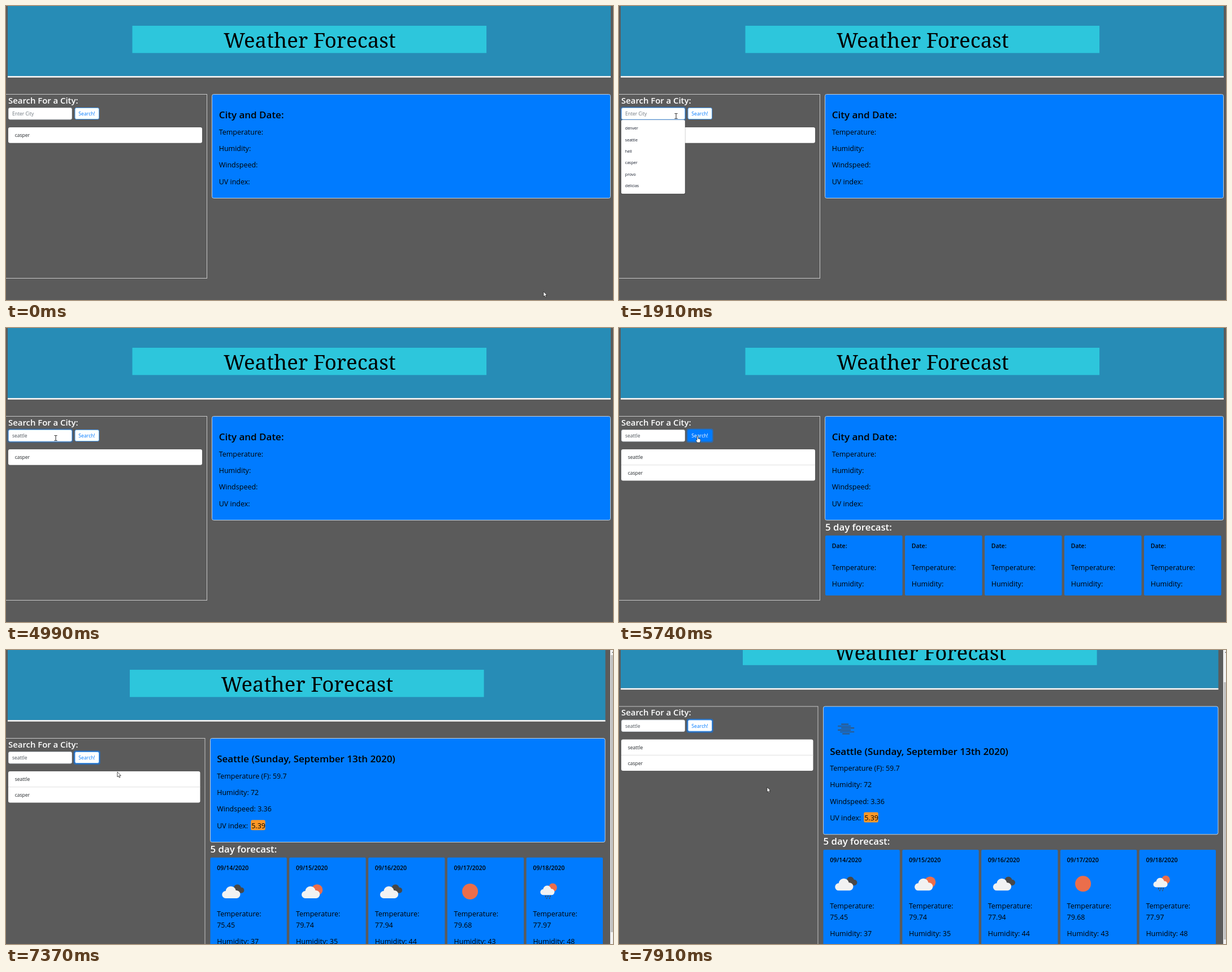
Write an HTML page that moves like this. It is 1074 px wide and 521 px high and loops after 8000 ms.

```html
<!DOCTYPE html>
<html lang="en">
<head>
<meta charset="utf-8">
<title>Weather Forecast</title>
<style>
  html, body { margin: 0; height: 100%; overflow: hidden; background: #5b5b5b; }
  svg { display: block; width: 1074px; height: 521px; font-family: "Open Sans", "Noto Sans", sans-serif; }
  text { white-space: pre; }
  .title { font-family: "Noto Serif", serif; text-anchor: middle; }
  .strong { font-weight: 600; }
</style>
</head>
<body>
<svg id="stage" viewBox="0 0 1074 521"></svg>
<script>
const LOOP = 8000;
const BLUE = '#007bff';
const stage = document.getElementById('stage');

// When things happen, in ms
const FOCUS = 1360, SUGGEST = 1490, PRESS = 5520, RESULT = 5630,
      HEADING = 6070, CURRENT = 6530, FORECAST = 6620, MAIN_ICON = 7480;

// Pointer moves: start, end, steps, target x, target y
const MOVES = [
  [100, 400, 4, 410, 298], [550, 1260, 8, 101, 195], [4990, 4990, 1, 88, 195],
  [5090, 5410, 4, 139, 192], [6830, 7370, 6, 197, 216],
  [7480, 7580, 2, 217, 226], [7710, 7910, 3, 262, 243]
];
// Key presses: time and caret position afterwards
const KEYS = [[3000, 15], [3120, 20], [3240, 24.5], [3440, 27.5], [3670, 30.5], [3770, 33], [3990, 37.5]];
const SCROLLS = [[7580, 13.5], [7710, 30], [7810, 45], [7910, 56.5]];

const CITIES = ['denver', 'seattle', 'hell', 'casper', 'provo', 'delicias'];
const DAYS = [
  { date: '09/14/2020', temp: 75.45, humidity: 37, icon: 'clouds' },
  { date: '09/15/2020', temp: 79.74, humidity: 35, icon: 'partly' },
  { date: '09/16/2020', temp: 77.94, humidity: 44, icon: 'clouds' },
  { date: '09/17/2020', temp: 79.68, humidity: 43, icon: 'sun' },
  { date: '09/18/2020', temp: 77.97, humidity: 48, icon: 'rain' }
];

const rect = (x, y, w, h, fill, extra = '') =>
  `<rect x="${x}" y="${y}" width="${w}" height="${h}" fill="${fill}" ${extra}/>`;
const text = (x, y, size, content, fill = '#000', cls = '') =>
  `<text x="${x}" y="${y}" font-size="${size}" fill="${fill}" class="${cls}">${content}</text>`;
const circle = (x, y, r) => `<circle cx="${x}" cy="${y}" r="${r}" fill="#eb6e4b"/>`;
const cloud = (x, y, scale = 1, fill = '#f2f2f2') =>
  `<path transform="translate(${x} ${y}) scale(${scale})" fill="${fill}"
    d="M6.5 22a6.5 6.5 0 0 1 0-13a9.1 9.1 0 0 1 18-1a7 7 0 0 1 1.5 14z"/>`;
const strokes = (d, width) =>
  `<path d="${d}" fill="none" stroke="#484848" stroke-width="${width}"/>`;

const ICONS = {
  clouds: (x, y) => cloud(x + 25, y - 13, .72, '#484848') + cloud(x + 9, y - 10),
  partly: (x, y) => circle(x + 37.5, y - 3, 9.8) + cloud(x + 10, y - 10),
  sun: (x, y) => circle(x + 28.5, y, 14),
  rain: (x, y) => circle(x + 35, y - 7, 7.5) + cloud(x + 13, y - 11, .78) +
    strokes(`M${x + 23} ${y + 7}l-1 3m5-3l-1 3m5-3l-1 3m-5 1l-1 2m6-2l-1 2`, 1.4),
  mist: (x, y) =>
    strokes(`M${x + 20} ${y - 8.5}h13m-19 3.4h23m-17 3.4h23m-29 3.4h23m-19 3.4h25m-21 3.4h13`, 1.4)
};

function pointerAt(t) {
  let x = 951, y = 506;
  for (const [from, to, steps, tx, ty] of MOVES) {
    if (t < from) break;
    const done = Math.floor((t - from) / (to - from || 1) * (steps - 1) + 1e-6) + 1;
    const p = Math.min(1, done / steps);
    x += (tx - x) * p;
    y += (ty - y) * p;
  }
  const inRow = y > 180 && y < 202;
  const kind = inRow && x > 4 && x < 117 ? 'beam' : inRow && x > 121 && x < 166 ? 'hand' : 'arrow';
  return { x, y, kind };
}

const POINTERS = {
  arrow: '<path d="M0 0V9L2 7.2 3.4 10.2 4.9 9.6 3.6 6.6H6.3Z" fill="#fff" stroke="#222" stroke-width=".8"/>',
  beam: '<path d="M-2.5-4.5H-.7L0-4 .7-4.5H2.5M0-4V4M-2.5 4.5H-.7L0 4 .7 4.5H2.5" fill="none" stroke="#222"/>',
  hand: '<path d="M-1 0Q0-1 1 0V4L4 4.5Q5.5 5 5.3 7L4.5 11H-.5L-3.3 7Q-2.6 5.6-1 6.8Z" fill="#fff" stroke="#222" stroke-width=".7"/>'
};

function header(center, right) {
  return rect(3, 0, right - 3, 124.2, '#278cb6') + rect(3, 124.2, right - 3, 2.5, '#fff') +
    rect(center - 313.3, 35, 626.6, 48.3, '#2dc6dc') +
    text(center + .5, 74, 36.6, 'Weather Forecast', '#000', 'title');
}

function searchPanel(t, hover, shift, bottom) {
  const focused = t >= FOCUS && t < PRESS;
  const typed = KEYS.filter(([time]) => t >= time);
  const value = 'seattle'.slice(0, typed.length);
  const [since, caretX] = typed.at(-1) || [FOCUS, 11];

  let out = rect(-1.5, 156.5, 357 - shift, bottom - 156.5, 'none', 'stroke="#c8c8c8"') +
    text(4, 172.6, 14.9, 'Search For a City:', '#fff', 'strong');

  if (focused) out += rect(2, 178, 117, 25.5, 'rgba(0,123,255,.25)', 'rx="4"');
  out += rect(4.5, 180.5, 112, 20.5, '#fff', `rx="2.5" stroke="${focused ? '#80bdff' : '#ced4da'}"`) +
    text(11, 194.4, 8.5, value || 'Enter City', value ? '#495057' : '#6c757d');
  if (focused && Math.floor((t - since) / 530) % 2 === 0) out += rect(caretX, 185.5, .9, 11, '#333');

  if (t >= PRESS) out += rect(119.5, 178.3, 47.4, 25, 'rgba(0,123,255,.5)', 'rx="4"');
  out += rect(122, 180.5, 42.5, 20, hover ? BLUE : '#fff', `rx="2.5" stroke="${hover ? BLUE : '#4aa0ff'}"`) +
    text(128.3, 194, 8.7, 'Search!', hover ? '#fff' : BLUE);

  const history = t >= RESULT ? ['seattle', 'casper'] : ['casper'];
  out += rect(4, 215, 343 - shift, 27.8 * history.length, '#fff', 'rx="3"');
  history.forEach((city, i) => {
    if (i) out += rect(4, 242.4, 343 - shift, .8, '#d8d8d8');
    out += text(15.7, 232.3 + 27.7 * i, 8.5, city, '#212529');
  });

  if (t >= SUGGEST && typed.length < 7) {
    const matches = CITIES.filter(city => city.startsWith(value));
    const height = 9 + 20.3 * matches.length;
    out += rect(3.5, 202.5, 114, height + .8, 'rgba(0,0,0,.25)', 'rx="2"') +
      rect(4, 202, 112.8, height, '#fff', 'rx="2"');
    matches.forEach((city, i) => out += text(10.8, 219.4 + 20.3 * i, 7.1, city, '#111827'));
  }
  return out;
}

function currentCard(t, left, right, extra) {
  const x = left + 11.7;
  const edge = Math.round(left) - .5;
  const loaded = t >= CURRENT;
  const lines = loaded
    ? ['Temperature (F): 59.7', 'Humidity: 72', 'Windspeed: 3.36', 'UV index:']
    : ['Temperature:', 'Humidity:', 'Windspeed:', 'UV index:'];
  const heading = t >= HEADING ? 'Seattle (Sunday, September 13th 2020)' : 'City and Date:';
  let out = rect(edge, 156.5, right - edge - .5, 184 + extra, BLUE, 'rx="3" stroke="#c4d0dc"') +
    text(x, 199.2 + extra, 17, heading, '#000', 'strong');
  if (extra) out += ICONS.mist(x, 196.5);
  if (loaded) out += rect(x + 60, 301.3 + extra, 25.5, 18, '#fd9827', 'rx="2.5"') +
    text(x + 61, 315.7 + extra, 12.5, '5.39');
  lines.forEach((line, i) => out += text(x, 227.8 + 29.3 * i + extra, 12.5, line));
  return out;
}

function forecast(left, wide, extra, bottom) {
  const [step, width] = wide ? [139.8, 135.3] : [141, 136.5];
  let out = text(left, 359 + extra, 16.8, '5 day forecast:', '#fff', 'strong');
  DAYS.forEach(({ date, temp, humidity, icon }, i) => {
    const x = left + step * i, tx = x + 11.7;
    const line = (y, s) => text(tx, y + extra, 12.5, s);
    out += rect(x, 367.7 + extra, width, bottom - 367.7 - extra, BLUE, 'rx="2"') +
      text(tx, 390 + extra, 10.5, wide ? date : 'Date:', '#000', 'strong');
    out += wide
      ? ICONS[icon](tx, 428 + extra) + line(471.5, 'Temperature:') + line(491.7, temp) + line(521, 'Humidity: ' + humidity)
      : line(428.6, 'Temperature:') + line(457.8, 'Humidity:');
  });
  return out;
}

function scrollbar(offset, extra) {
  return rect(1069, 0, 5, 521, '#f1f1f1') +
    rect(1070, 9 + offset * .85, 4, extra ? 456 : 491, '#c1c1c1') +
    '<path d="M1072 5l4-4v4z" fill="#505050"/>';
}

function scene(t) {
  const pointer = pointerAt(t);
  const wide = t >= FORECAST;
  const left = wide ? 361.5 : 365, right = wide ? 1060.5 : 1070;
  const extra = t >= MAIN_ICON ? 42.8 : 0;
  const bottom = (wide ? 537 : 474) + extra;
  const offset = SCROLLS.reduce((y, [time, to]) => t >= time ? to : y, 0);
  return `<g transform="translate(0 ${-offset})">` +
    header(wide ? 532.3 : 536.8, right) +
    currentCard(t, left, right, extra) +
    (t >= RESULT ? forecast(left, wide, extra, bottom) : '') +
    searchPanel(t, pointer.kind === 'hand', wide ? 3.5 : 0, bottom + 8.5) + '</g>' +
    (wide ? scrollbar(offset, extra) : '') +
    `<g transform="translate(${pointer.x} ${pointer.y})">${POINTERS[pointer.kind]}</g>`;
}

let shown = '';
function draw() {
  const markup = scene(performance.now() % LOOP);
  if (markup !== shown) stage.innerHTML = shown = markup;
  requestAnimationFrame(draw);
}
draw();
</script>
</body>
</html>
```
